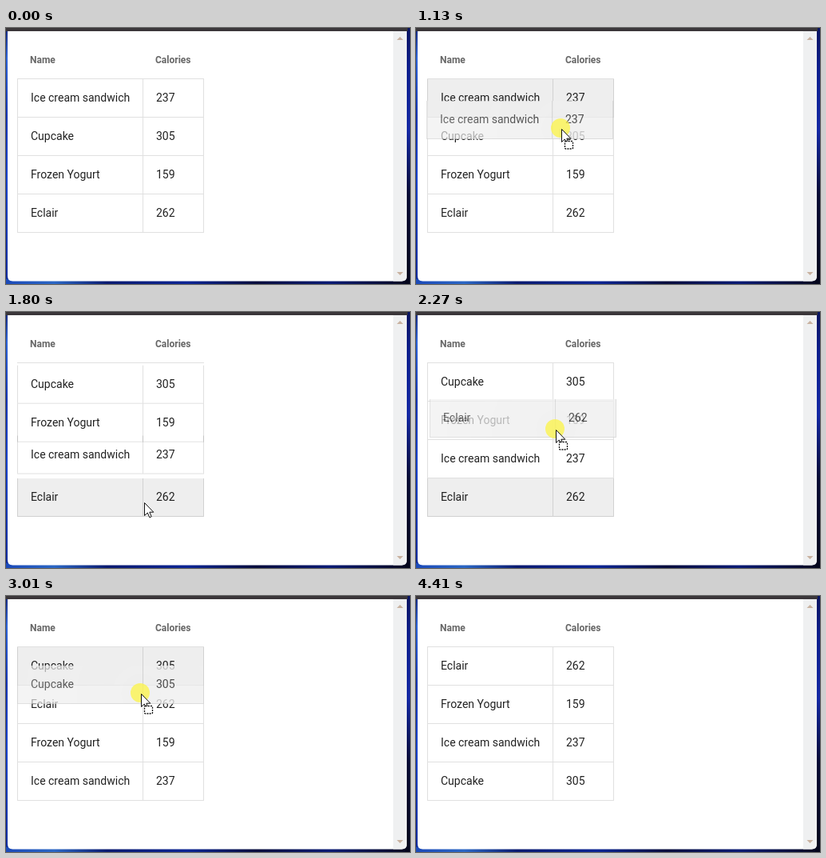
These frames come from a looping animation (506 by 320 pixels, 4480 ms). An HTML page:

```html
<!DOCTYPE html>
<html lang="en">
<head>
<meta charset="utf-8">
<title>Table row drag and drop</title>
<style>
  html, body { margin: 0; width: 100%; height: 100%; overflow: hidden; background: #fff; }
  svg { display: block; width: 100vw; height: 100vh; }
  text { font: 14px Roboto, sans-serif; fill: rgba(0, 0, 0, .87); }
  .head { font-size: 12px; font-weight: 700; fill: rgba(0, 0, 0, .6); }
  .line { fill: none; stroke: #000; stroke-opacity: .12; }
</style>
</head>
<body>
<svg viewBox="0 0 506 320">
  <defs>
    <linearGradient id="left" x2="0" y2="1">
      <stop offset="0" stop-color="#16277c"/>
      <stop offset=".12" stop-color="#2a62d8"/>
      <stop offset=".35" stop-color="#1233b4"/>
      <stop offset=".6" stop-color="#1440cc"/>
      <stop offset="1" stop-color="#0c2a9c"/>
    </linearGradient>
    <linearGradient id="right" x2="0" y2="1">
      <stop offset="0" stop-color="#0a1560"/>
      <stop offset=".15" stop-color="#0b1d8c"/>
      <stop offset=".4" stop-color="#1428a4"/>
      <stop offset=".65" stop-color="#060a34"/>
      <stop offset="1" stop-color="#04061c"/>
    </linearGradient>
    <linearGradient id="bottom">
      <stop offset="0" stop-color="#1b49b8"/>
      <stop offset=".12" stop-color="#2a66c4"/>
      <stop offset=".25" stop-color="#0a1a70"/>
      <stop offset=".45" stop-color="#0c2494"/>
      <stop offset=".62" stop-color="#060c3c"/>
      <stop offset=".8" stop-color="#0a1a74"/>
      <stop offset="1" stop-color="#04061c"/>
    </linearGradient>
    <radialGradient id="fade" gradientUnits="userSpaceOnUse" r="190">
      <stop offset="0" stop-color="#fff" stop-opacity=".82"/>
      <stop offset="1" stop-color="#fff" stop-opacity=".62"/>
    </radialGradient>
    <mask id="soft" maskUnits="userSpaceOnUse" x="0" y="-10" width="300" height="70" style="mask-type:alpha">
      <rect y="-10" width="300" height="70" fill="url(#fade)"/>
    </mask>
  </defs>

  <rect width="506" height="320" fill="url(#bottom)"/>
  <rect width="4" height="314" fill="url(#left)"/>
  <rect x="500" width="6" height="320" fill="url(#right)"/>
  <path d="M2 0H502V310Q502 316.5 495.500 316.500H8.500Q2 316.500 2 310Z" fill="#fff"/>
  <path d="M485 3H502V310Q502 316.500 495.500 316.500H485Z" fill="#eff0f1"/>
  <rect width="503" height="4" fill="#3a3639"/>
  <path d="M489.500 15H497.500L493.500 11ZM489.500 305H497.500L493.500 309Z" fill="#c9b2a0"/>

  <text class="head" x="30" y="44">Name</text>
  <text class="head" x="187" y="44">Calories</text>
  <path class="line" d="M14 63.500H248"/>
  <g id="rows"></g>
  <g id="ghost" mask="url(#soft)"></g>
  <g id="pointer">
    <circle id="press" cx="-1" cy="-1" r="12" fill="#fbf44c" opacity=".78"/>
    <path d="M.5 .5V16.500L4.300 13L6.800 18.800L9.200 17.800L6.800 12.200H11.800Z" fill="#fff" stroke="#111"/>
    <rect id="box" x="4.500" y="15.500" width="10" height="9.500" rx="1" fill="#fff" stroke="#111" stroke-width="1.300" stroke-dasharray="2 1.200"/>
  </g>
</svg>
<script>
const LOOP = 4480, START = 390, STEP = 67, MOVE = 300;
const TOP = 64, ROW = 48;
const foods = {
  ice: ['Ice cream sandwich', 237],
  cup: ['Cupcake', 305],
  yog: ['Frozen Yogurt', 159],
  ecl: ['Eclair', 262]
};

// over: row under the pointer at the drop; it stays lit until the pointer moves (free)
const drags = [
  { id: 'ice', press: 926, start: 993, drop: 1585, free: 1700, over: 'yog', x: 183, y: 99, to: 2 },
  { id: 'ecl', press: 1931, start: 1990, drop: 2385, free: 2530, over: 'yog', x: 172, y: 246, to: 1 },
  { id: 'cup', press: 2803, start: 2870, drop: 3386, free: 3600, over: 'ice', x: 169, y: 99, to: 3 }
];

// pointer path: time, x, y
const path = [
  [390, 421, 139], [457, 362, 140], [524, 290, 136], [591, 233, 121], [658, 198, 108],
  [792, 184, 100], [859, 183, 99], [993, 183, 99], [1060, 182, 108], [1194, 181, 143],
  [1395, 179, 189], [1462, 179, 195], [1529, 177, 198], [1596, 177, 199], [1663, 176, 206],
  [1797, 173, 238], [1864, 172, 244], [1931, 172, 244], [1998, 172, 237], [2132, 174, 186],
  [2266, 175, 147], [2467, 175, 146], [2668, 171, 111], [2736, 169, 99], [2870, 169, 99],
  [3003, 169, 122], [3137, 169, 205], [3204, 168, 235], [3271, 168, 245], [3405, 168, 245],
  [3539, 167, 244], [3606, 167, 262], [3673, 165, 294], [3730, 165, 310]
];

const $ = id => document.getElementById(id);
const mix = (a, b, k) => a + (b - a) * k;
const move = (el, x, y) => el.setAttribute('transform', `translate(${x} ${y})`);
const show = (el, on) => el.setAttribute('display', on ? 'inline' : 'none');

// CSS "ease" curve
function ease(x) {
  if (x <= 0) return 0;
  if (x >= 1) return 1;
  let lo = 0, hi = 1, u;
  for (let i = 0; i < 24; i++) {
    u = (lo + hi) / 2;
    const bx = .75 * u * (1 - u) + u ** 3;
    if (bx < x) lo = u; else hi = u;
  }
  return .3 * u * (1 - u) ** 2 + 3 * u * u * (1 - u) + u ** 3;
}

const rowMarkup = ([name, calories], fill) => `
  <rect x="14" width="234" height="48" fill="${fill}"/>
  <path class="line" d="M14.500 0V47M171.500 0V47M247.500 0V47M14 47.500H248"/>
  <text x="31" y="28">${name}</text><text x="188" y="28">${calories}</text>`;

function reorder(order, drag) {
  const next = order.filter(id => id !== drag.id);
  next.splice(drag.to, 0, drag.id);
  return next;
}

function pointerAt(t) {
  const i = path.findIndex(p => p[0] > t);
  if (i < 1) return null;
  const [a, b] = [path[i - 1], path[i]];
  const k = (t - a[0]) / (b[0] - a[0]);
  return { x: Math.round(mix(a[1], b[1], k)), y: Math.round(mix(a[2], b[2], k)) };
}

function hovered(t, order, pointer, drag) {
  if (drag) return drag.id;
  const stale = drags.find(d => t >= d.drop && t < d.free);
  if (stale) return stale.over;
  if (!pointer || pointer.x < 14 || pointer.x >= 248) return null;
  return order[Math.floor((pointer.y - TOP) / ROW)];
}

function draw(time) {
  const t = time < START - 5 ? 0 : START + STEP * Math.floor((time - START + 5) / STEP);
  let order = Object.keys(foods), before = order, k = 1;
  for (const d of drags) {
    if (t < d.drop) break;
    before = order;
    order = reorder(order, d);
    k = ease((t - d.drop) / MOVE);
  }

  const pointer = pointerAt(t);
  const pressed = drags.find(d => t >= d.press && t < d.drop);
  const drag = pressed && t >= pressed.start ? pressed : null;
  const lit = hovered(t, order, pointer, drag);

  $('rows').innerHTML = order.map((id, i) => {
    const y = TOP + ROW * mix(before.indexOf(id), i, k);
    return `<g transform="translate(0 ${y})">${rowMarkup(foods[id], id === lit ? '#eee' : 'none')}</g>`;
  }).join('');

  show($('ghost'), drag);
  if (drag) {
    const y = TOP + ROW * order.indexOf(drag.id);
    $('ghost').innerHTML = rowMarkup(foods[drag.id], '#eee');
    move($('ghost'), pointer.x - drag.x, y + pointer.y - drag.y);
    $('fade').setAttribute('cx', drag.x);
    $('fade').setAttribute('cy', drag.y - y);
  }

  show($('pointer'), pointer);
  show($('press'), pressed);
  show($('box'), drag);
  if (pointer) move($('pointer'), pointer.x, pointer.y);
}

const begin = performance.now();
function tick() {
  draw((performance.now() - begin) % LOOP);
  requestAnimationFrame(tick);
}
tick();
</script>
</body>
</html>
```
